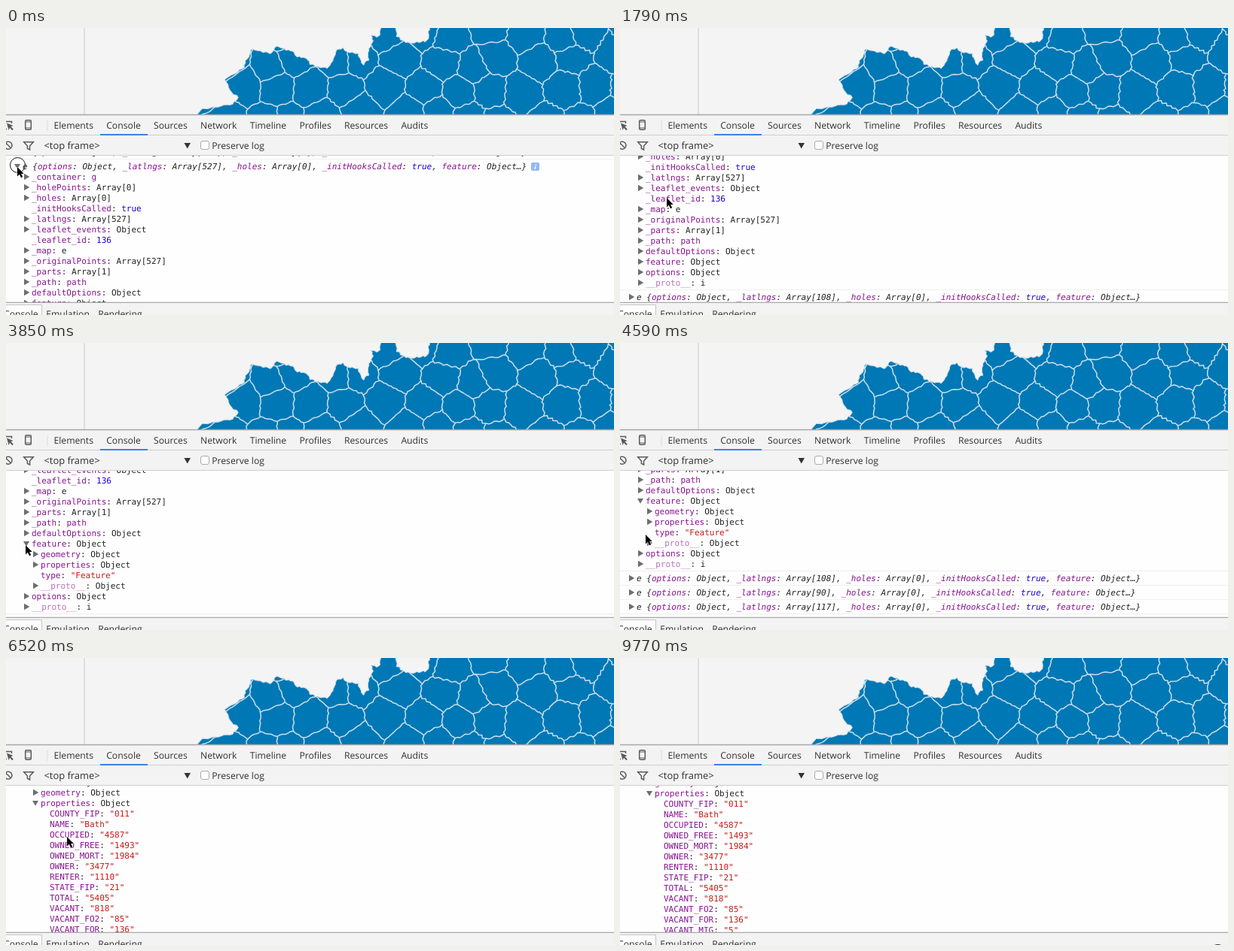
Write an HTML page that moves like this. It is 807x382 px and loops after 9.87 s.

```html
<!DOCTYPE html>
<html lang="en">
<head>
<meta charset="utf-8">
<title>Console</title>
<style>
  html, body { margin: 0; width: 100%; height: 100%; overflow: hidden; background: #fff; }
  svg { display: block; }
  text { white-space: pre; text-rendering: geometricPrecision; }
  .ui text { font: 12.2px "Open Sans", "Noto Sans", sans-serif; fill: #303030; }
  .log text { font: 11px "DejaVu Sans Mono", "Liberation Mono", monospace; fill: #222; }
  .log .head { font-style: italic; }
  .log .tri { fill: #6e6e6e; }
  .key { fill: #881391; }
  .dim { fill: #b871bd; }
  .num { fill: #1c00cf; }
  .str { fill: #c41a16; }
</style>
</head>
<body>
<svg id="stage" width="807" height="382" viewBox="0 0 807 382">
  <defs>
    <clipPath id="mapBox"><rect width="807" height="115"/></clipPath>
    <clipPath id="landBox"><path id="landClip"/></clipPath>
    <clipPath id="logBox"><rect y="170" width="807" height="195"/></clipPath>
  </defs>

  <rect width="807" height="115" fill="#f4f4f4"/>
  <path d="M104 0V115" stroke="#d9d9d9" stroke-width="1.5"/>
  <g clip-path="url(#mapBox)" stroke-linejoin="round">
    <path id="land" fill="#0078b5" stroke="#c4d9e6"/>
    <g clip-path="url(#landBox)"><path id="borders" fill="none" stroke="#c9deeb" stroke-width="1.5"/></g>
  </g>

  <rect y="170" width="807" height="195" fill="#fefefe"/>
  <g class="log" clip-path="url(#logBox)"><g id="log"></g></g>

  <g class="ui">
    <rect y="115" width="807" height="55" fill="#f3f3f3"/>
    <path d="M0 115.5H807M0 365.5H807" stroke="#a8a8a8" stroke-width="1.3"/>
    <path d="M0 142.5H807M0 169.5H807" stroke="#cfcfcf"/>
    <path d="M55 123V137" stroke="#dcdcdc"/>
    <rect x="125" y="141" width="63" height="2" fill="#3b82e8"/>
    <text id="tabs" x="46.3" y="134"></text>

    <g fill="none" stroke="#5a5a5a" stroke-width="1.5">
      <path d="M-2 124.5H7.5V127M-2 134.5H1"/>
      <rect x="25.7" y="122.7" width="7.6" height="12.6" rx="1.5"/>
      <path d="M26 125H33M26 133H33" stroke-width="1"/>
      <circle cx="3" cy="156.3" r="5"/>
      <path d="M-.5 152.8L6.5 159.8"/>
      <path d="M23.7 151.7H36.3L31.6 157V162L28.4 160.5V157Z"/>
    </g>
    <path d="M1 126.5L9.5 130L6.5 131.3L9.8 134.8L8.3 136.2L5 132.8L3.6 136Z" fill="#5a5a5a"/>
    <path d="M236.5 153H245L240.7 160.5Z" fill="#333"/>
    <rect x="258.5" y="150.5" width="11" height="11" rx="2.5" fill="#fff" stroke="#ababab"/>
    <text x="50.5" y="161" style="font-size:12.9px">&lt;top frame&gt;</text>
    <text x="273.2" y="161">Preserve log</text>

    <rect y="366" width="807" height="16" fill="#f3f3f3"/>
    <path d="M-2 368.5H47.5V384H-2Z" fill="#fdfdfd" stroke="#c4c4c4"/>
    <text x="-3" y="385">Console</text>
    <text x="53.2" y="385">Emulation</text>
    <text x="122.2" y="385">Rendering</text>
  </g>

  <circle id="ring" r="10" fill="none" stroke="#111"/>
  <path id="cursor" d="M1 1V13.4L3.8 10.8L6 15.2L8.2 14.2L6.1 9.9H9.7Z"
        fill="#000" stroke="#fff" paint-order="stroke"/>
</svg>

<script>
const LOOP = 9870;
const $ = id => document.getElementById(id);
const mix = (a, b, k) => a + (b - a) * k;

// ---- map: a coast line around seeded Voronoi cells ----
let seed = 7;
const rand = () => (seed = seed * 16807 % 2147483647) / 2147483647;

// Uneven lines: the shift depends on place alone, so neighbours share their border.
function side(a, b) {
  const n = Math.ceil(Math.hypot(b[0] - a[0], b[1] - a[1]) / 4);
  return Array.from({ length: n + 1 }, (_, i) => {
    const x = mix(a[0], b[0], i / n), y = mix(a[1], b[1], i / n), size = .4 + x / 900;
    return [x + size * Math.sin(y * 1.1 + x * .3), y + size * Math.sin(x * 1.2 - y * .4)].map(v => v.toFixed(1));
  });
}

const coast = ('253,116 260,108 275,106 301,101 309,92 299,86 291,68 308,58 316,52 318,44 324,36 325,28 338,31 352,34 ' +
  '359,24 372,29 380,31 386,38 398,40 404,48 414,52 427,53 432,47 436,38 439,29 447,27 453,32 467,34 474,49 ' +
  '481,42 481,30 487,18 485,10 495,12 498,-2 517,-2 519,11 527,17 534,20 548,19 560,17 562,-2 809,-2 809,117')
  .split(' ').map(p => p.split(',').map(Number));
const land = 'M' + coast.slice(1).flatMap((p, i) => side(coast[i], p)).join('L') + 'Z';
$('land').setAttribute('d', land);
$('landClip').setAttribute('d', land);

const sites = [];
for (let r = 0; r < 4; r++)
  for (let c = 0; c < 13; c++)
    sites.push([270 + 46 * (c + r % 2 / 2) + 26 * (rand() - .5), 8 + 37 * r + 22 * (rand() - .5)]);

// Keeps the part of a polygon that is nearer to site a than to site b.
function nearer(poly, a, b) {
  const gap = p => (p[0] - b[0]) ** 2 + (p[1] - b[1]) ** 2 - (p[0] - a[0]) ** 2 - (p[1] - a[1]) ** 2;
  return poly.flatMap((p, i) => {
    const q = poly[(i + 1) % poly.length], u = gap(p), v = gap(q), k = u / (u - v);
    const cut = u * v < 0 ? [[mix(p[0], q[0], k), mix(p[1], q[1], k)]] : [];
    return u >= 0 ? [p, ...cut] : cut;
  });
}

let lines = '';
for (const a of sites) {
  let cell = [[200, -60], [900, -60], [900, 180], [200, 180]];
  for (const b of sites) if (b !== a) cell = nearer(cell, a, b);
  cell.forEach((p, i) => {
    const ends = [p, cell[(i + 1) % cell.length]].sort((u, v) => u[0] - v[0]);
    lines += 'M' + side(...ends).join('L');
  });
}
$('borders').setAttribute('d', lines);

// ---- toolbar ----
$('tabs').innerHTML = 'Elements Console Sources Network Timeline Profiles Resources Audits'.split(' ')
  .map(name => `<tspan dx="17.2">${name}</tspan>`).join('');

// ---- console log ----
const span = (cls, s) => `<tspan class="${cls}">${s}</tspan>`;

function field(key, value) {
  const cls = /^"/.test(value) ? 'str' : /^(true|\d+)$/.test(value) ? 'num' : /^(g|path)$/.test(value) ? 'key' : '';
  return span(key === '__proto__' ? 'dim' : 'key', key) + ': ' + span(cls, value);
}

const arrow = (x, y, down) =>
  `<path class="tri" d="${down ? `M${x - 1} ${y - 3}h8l-4 6.8z` : `M${x} ${y - 4.2}v8.4l7.3-4.2z`}"/>`;

// mark: '>' closed, 'v' open, ' ' none
function row(y, level, mark, key, value) {
  const x = 22 + 12 * level;
  return (mark === ' ' ? '' : arrow(x - 10, y, mark === 'v')) + `<text x="${x}" y="${y + 4}">${field(key, value)}</text>`;
}

function entry(y, count, down) {
  const parts = [['options', 'Object'], ['_latlngs', `Array[${count}]`], ['_holes', 'Array[0]'],
    ['_initHooksCalled', 'true'], ['feature', 'Object…']];
  return `<path d="M0 ${y - 9.5}H807" stroke="#efefef"/>` + arrow(12, y, down) +
    `<text class="head" x="22" y="${y + 4}">e {${parts.map(p => field(...p)).join(', ')}}</text>`;
}

const info = `<rect x="697" y="179" width="11" height="11" rx="2" fill="#94b8f2"/>
  <path d="M703.4 181.3l-.3 1.4M702.8 184l-1 4" stroke="#fff" stroke-width="1.5"/>`;

const before = ['>_container:g', '>_holePoints:Array[0]', '>_holes:Array[0]', ' _initHooksCalled:true',
  '>_latlngs:Array[527]', '>_leaflet_events:Object', ' _leaflet_id:136', '>_map:e', '>_originalPoints:Array[527]',
  '>_parts:Array[1]', '>_path:path', '>defaultOptions:Object'];
const after = ['>options:Object', '>__proto__:i'];
const props = { COUNTY_FIP: '011', NAME: 'Bath', OCCUPIED: 4587, OWNED_FREE: 1493, OWNED_MORT: 1984, OWNER: 3477,
  RENTER: 1110, STATE_FIP: 21, TOTAL: 5405, VACANT: 818, VACANT_FO2: 85, VACANT_FOR: 136, VACANT_MIG: 5 };

// open: 0 all closed, 1 feature open, 2 properties open too
function pane(open) {
  let y = 184, out = entry(165, 527) + entry(y, 527, true) + info;
  const add = (level, s) => {
    const [key, value] = s.slice(1).split(':');
    out += row(y += 14, level, s[0], key, value);
  };
  before.forEach(s => add(1, s));
  add(1, (open ? 'v' : '>') + 'feature:Object');
  if (open) {
    add(2, '>geometry:Object');
    add(2, (open > 1 ? 'v' : '>') + 'properties:Object');
    if (open > 1) for (const k in props) add(3, ` ${k}:"${props[k]}"`);
    add(2, ' type:"Feature"');
    add(2, '>__proto__:Object');
  }
  after.forEach(s => add(1, s));
  for (const n of [108, 90, 117, 143]) out += entry(y += 19, n);
  return `<g>${out}</g>`;
}
$('log').innerHTML = pane(0) + pane(1) + pane(2);
const panes = [...$('log').children];

// ---- motion ----
// The screen refreshes only at these times: from, to, number of refreshes.
const bursts = [[0, 150, 2], [600, 1200, 5], [1500, 2520, 8], [2670, 3260, 5], [3850, 4890, 8],
  [5030, 5330, 3], [6080, 7110, 8], [7260, 8290, 8], [8430, 9320, 7], [9770, 9770, 1]];
const ticks = bursts.flatMap(([from, to, n]) =>
  Array.from({ length: n }, (_, i) => Math.floor(mix(from, to, i / (n - 1 || 1)) / 10) * 10));

// Flicks of the wheel that slow down to rest.
const flicks = [
  { from: 1500, to: 2520, by: 96, brake: 2.36 },
  { from: 3850, to: 4890, by: 67, brake: 1.75 },
  { from: 6080, to: 7110, by: 51, brake: 2.36 }];
function scrollAt(t) {
  const lead = 25;
  return Math.round(flicks.filter(f => t >= f.from).reduce((sum, f) => {
    const k = Math.min(1, (t - f.from + lead) / (f.to - f.from + lead));
    return sum + f.by * (1 - (1 - k) ** f.brake);
  }, 0));
}

// Cursor poses: time, x, y
const poses = [[450, 14, 184], [1200, 61, 225], [2080, 61, 225], [2960, 25, 268], [4150, 25, 268], [5030, 41, 239],
  [6230, 41, 239], [7110, 194, 232], [7550, 131, 194], [7840, 93, 245], [8290, 206, 314], [8870, 490, 293], [9320, 792, 393]];
function cursorAt(t) {
  const i = poses.findIndex(p => p[0] > t);
  if (i < 1) return poses.at(i).slice(1);
  const [a, b] = [poses[i - 1], poses[i]];
  const k = (t - a[0]) / (b[0] - a[0]), ease = k * k * (3 - 2 * k);
  return [1, 2].map(j => Math.round(mix(a[j], b[j], ease)));
}

const clicks = [0, 3110, 5180, 9770];

let last;
function draw(now) {
  const t = ticks.findLast(s => s <= now % LOOP);
  if (t === last) return;
  last = t;
  const [x, y] = cursorAt(t);
  const open = clicks.slice(1, 3).filter(c => t >= c).length;
  const ring = clicks.some(c => t >= c && t < c + 150);
  panes.forEach((p, i) => p.setAttribute('display', i === open ? 'inline' : 'none'));
  $('log').setAttribute('transform', `translate(0 ${-scrollAt(t)})`);
  $('cursor').setAttribute('transform', `translate(${x} ${y})`);
  $('ring').setAttribute('transform', `translate(${x + 1.5} ${y - 1.5})`);
  $('ring').setAttribute('display', ring ? 'inline' : 'none');
}

const start = performance.now();
function tick() {
  draw(performance.now() - start);
  requestAnimationFrame(tick);
}
tick();
</script>
</body>
</html>
```
